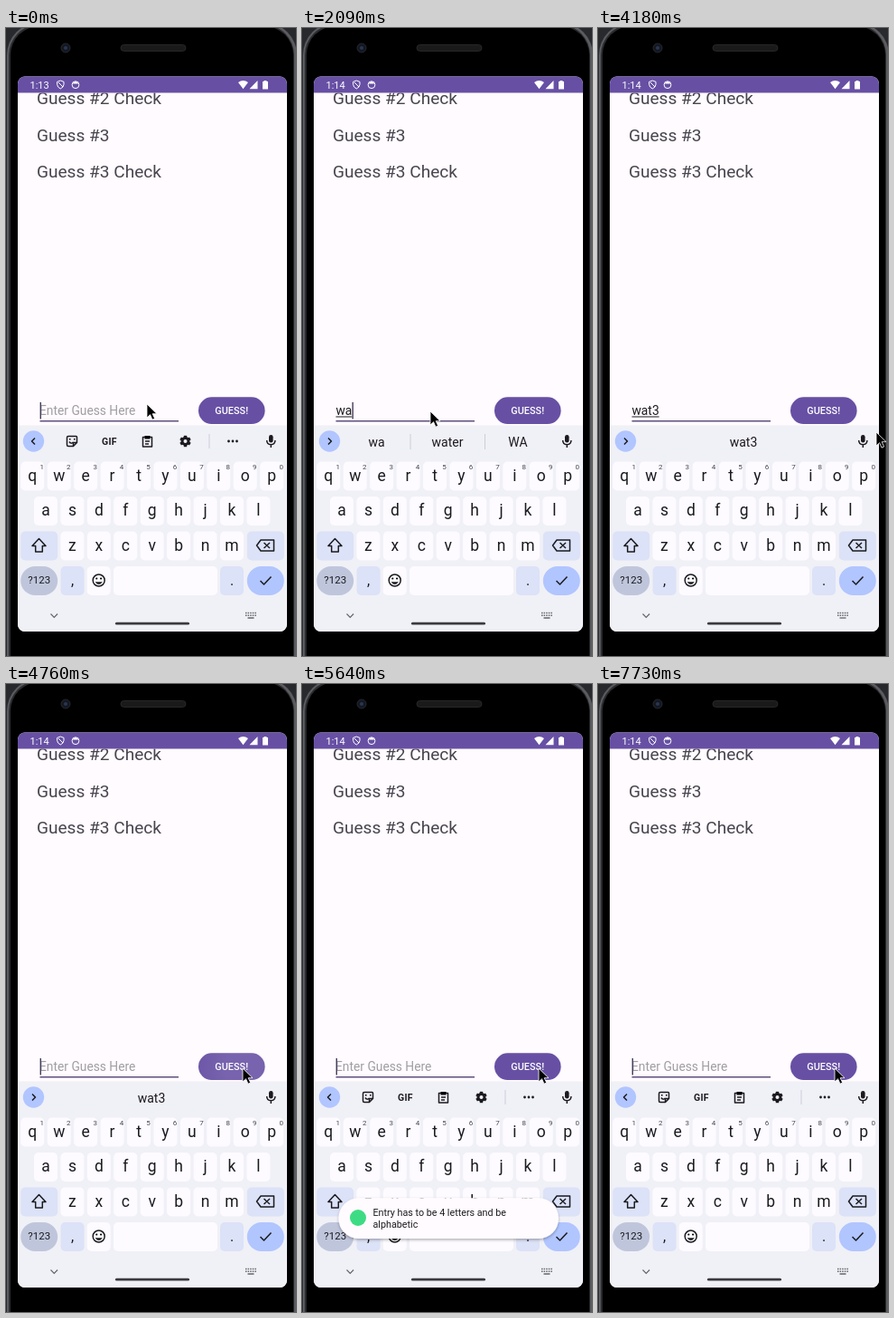
Animation of 321x693 px, one loop 8 s. Source, as an HTML page:

```html
<!DOCTYPE html>
<html lang="en">
<head>
<meta charset="utf-8">
<style>
html, body { margin: 0; width: 100%; height: 100%; overflow: hidden; background: #28292c; }
svg { display: block; width: 321px; height: 693px; font-family: Roboto, sans-serif; }
.mid { text-anchor: middle; }
.line { fill: none; stroke: #1b1b1f; stroke-width: 1.5; stroke-linejoin: round; }
.list { font-size: 19.1px; fill: #49454f; }
.entry { font-size: 13.8px; }
.word { font-size: 14px; fill: #1b1b1f; text-anchor: middle; }
</style>
</head>
<body>
<svg viewBox="0 0 321 693">
  <defs>
    <clipPath id="screen"><rect x="13" y="53.5" width="298" height="612.5" rx="8"/></clipPath>
    <clipPath id="page"><rect x="13" y="71.5" width="298" height="367"/></clipPath>
    <radialGradient id="glow" gradientUnits="userSpaceOnUse" cx="262" cy="424" r="50">
      <stop offset=".4" stop-color="#fff" stop-opacity=".11"/>
      <stop offset="1" stop-color="#fff" stop-opacity=".04"/>
    </radialGradient>
    <filter id="shadow" x="-10%" y="-30%" width="120%" height="170%">
      <feDropShadow dx="0" dy="1.5" stdDeviation="1.6" flood-opacity=".3"/>
    </filter>
  </defs>

  <!-- phone body -->
  <rect x="1" y="-6" width="321" height="740" rx="36" fill="#5a5c60"/>
  <rect x="3" y="-4" width="316" height="736" rx="34" fill="#2b2c2f"/>
  <rect x="5" y="-2" width="313" height="732" rx="32" fill="#000"/>
  <circle cx="66" cy="22" r="5" fill="#14171f" stroke="#24272d"/>
  <circle cx="66" cy="22" r="2" fill="#273659"/>
  <rect x="127" y="18.5" width="72" height="7" rx="3.5" fill="#1a1a1b" stroke="#272728"/>

  <g clip-path="url(#screen)">
    <rect x="13" y="53" width="298" height="613" fill="#fffbfe"/>
    <g clip-path="url(#page)" class="list">
      <text x="33.9" y="84">Guess #2 Check</text>
      <text x="33.9" y="124.5">Guess #3</text>
      <text x="33.9" y="165">Guess #3 Check</text>
    </g>

    <!-- status bar -->
    <rect x="13" y="53" width="298" height="18.5" fill="#6750a4"/>
    <g fill="#fff">
      <text id="clock" x="26.5" y="66.8" font-size="11"></text>
      <path d="M257 60Q262.5 56 268 60L262.5 67.2ZM278.500 58V67.200H269.500ZM284 59H285.500V58H288.500V59H290V67.500H284Z"/>
      <g fill="none" stroke="#fff">
        <path d="M60.3 58L64 59.4V62.3Q63.8 65.5 60.3 67Q56.8 65.5 56.6 62.3V59.4ZM58 60L63 65"/>
        <circle cx="77" cy="62.7" r="3.9"/>
      </g>
      <path d="M73.5 61.5Q77 56.5 80.5 61.5Z"/>
    </g>

    <!-- entry row -->
    <rect x="37.5" y="433" width="153.5" height="1.5" fill="#5e4f80"/>
    <text id="hint" class="entry" x="37" y="427" fill="#a09da3">Enter Guess Here</text>
    <text id="typed" class="entry" x="37.5" y="427" fill="#1c1b1f"></text>
    <rect id="under" x="37.5" y="428.5" height="1" fill="#1c1b1f"/>
    <rect id="caret" y="413" width="1.4" height="18.5" fill="#453b5c"/>
    <rect x="213" y="407.3" width="73.6" height="29.7" rx="14.85" fill="#6750a4"/>
    <rect id="ripple" x="213" y="407.3" width="73.6" height="29.7" rx="14.85" fill="url(#glow)"/>
    <text class="mid" x="249.7" y="426.3" font-size="10.9" font-weight="500" fill="#fff">GUESS!</text>

    <!-- keyboard -->
    <rect x="13" y="438.5" width="298" height="228" fill="#f0f0f7"/>
    <circle cx="30.5" cy="456" r="11.7" fill="#b1c5ff"/>
    <path id="chevron" class="line"/>
    <g id="tools">
      <path class="line" d="M69 450.500H77.500Q78.500 450.500 78.500 451.500V457.500L74.500 461.500H69Q67.500 461.500 67.500 460V452Q67.500 450.500 69 450.500ZM78.500 457.500H74.500V461.500M70 456.500Q72 459.500 74.500 457"/>
      <path d="M70 453h1.5v1.5h-1.5zM75 453h1.5v1.5h-1.5z"/>
      <text class="mid" x="114.5" y="460" font-size="10.5" font-weight="700" letter-spacing=".3" fill="#1b1b1f">GIF</text>
      <path class="line" d="M151.5 451.5H161.5V462H151.5ZM154 456H159M154 459H158"/>
      <path d="M153.5 450H159.5V453.5H153.5Z"/>
      <g id="gear" fill="#1b1b1f"><circle cx="198.5" cy="456" r="3.5" fill="none" stroke="#1b1b1f" stroke-width="3"/></g>
      <path d="M225 448V464" stroke="#cccdd6"/>
      <g fill="#1b1b1f"><circle cx="246.5" cy="456" r="1.4"/><circle cx="251" cy="456" r="1.4"/><circle cx="255.5" cy="456" r="1.4"/></g>
    </g>
    <g id="words">
      <path id="rules" d="M120 448V465M202.5 448V465" stroke="#cccdd6"/>
      <text class="word" x="82.5" y="461.5"></text>
      <text class="word" x="161" y="461.5"></text>
      <text class="word" x="239" y="461.5"></text>
    </g>
    <rect x="291" y="449" width="4.6" height="8.5" rx="2.3" fill="#1b1b1f"/>
    <path class="line" d="M288.7 455Q288.7 459.7 293.3 459.7Q297.9 459.7 297.9 455M293.3 459.7V463"/>
    <g id="keys"></g>
    <g class="line">
      <path d="M36.5 563.5L44 571.5H40.3V578H32.7V571.5H29Z"/>
      <path d="M277.5 571L282 565H296.5V577H282ZM285.5 568L292 574M292 568L285.5 574"/>
      <path d="M281.5 610L285.5 614L293.5 605.5"/>
      <circle cx="102.7" cy="609.5" r="6.5"/>
      <path d="M99 611.5Q102.7 616 106.4 611.5Z" fill="#1b1b1f" stroke-width=".5"/>
    </g>
    <circle cx="100.3" cy="607.5" r="1.1"/><circle cx="105.1" cy="607.5" r="1.1"/>
    <path d="M49.5 646.5L53.3 650.3L57.1 646.5" fill="none" stroke="#65656b" stroke-width="1.2"/>
    <rect x="121" y="655.8" width="82" height="2.8" rx="1.4" fill="#3a3a3e"/>
    <path d="M265 645.5H277M265 648.2H277" stroke="#65656b" stroke-width="1.5" stroke-dasharray="1.5 1.1"/>
    <path d="M267.5 651H274.5" stroke="#65656b" stroke-width="1.3"/>

    <!-- toast -->
    <g id="toast">
      <rect id="card" x="40.5" y="567.3" width="243.5" height="44.7" rx="22" fill="#fffbfe" filter="url(#shadow)"/>
      <g id="message" font-size="10.75" fill="#1c1b1f">
        <circle cx="62" cy="589" r="9" fill="#3ddc84"/>
        <text x="78.5" y="587">Entry has to be 4 letters and be</text>
        <text x="78.5" y="599.6">alphabetic</text>
      </g>
    </g>
  </g>
  <path id="pointer" d="M0 0V15L3.6 11.7L6 17.2L8.6 16L6.2 10.7H11Z" fill="#000" stroke="#fff" stroke-width=".8"/>
</svg>
<script>
const $ = id => document.getElementById(id);
const attr = (el, values) => { for (const k in values) el.setAttribute(k, values[k]); };
const show = (id, on) => attr($(id), { opacity: +on });

const PLAIN = '#fdfbff', SOFT = '#dce2f7';
const keys = [];
function key(x, y, w, label = '', fill = PLAIN, size = 17.5, rx = 5) {
  keys.push(`<rect x="${x - w / 2}" y="${y}" width="${w}" height="32" rx="${rx}" fill="${fill}"/>
    <text class="mid" x="${x}" y="${y + 15.5 + size * .33}" font-size="${size}" fill="#1b1b1f">${label}</text>`);
}
[['qwertyuiop', 29.3, 478.5], ['asdfghjkl', 44, 517], ['zxcvbnm', 73.4, 555.5]].forEach(([row, x0, y], r) =>
  [...row].forEach((c, i) => {
    const x = x0 + i * 29.43;
    key(x, y, 26, c);
    if (!r) keys.push(`<text class="mid" x="${x + 10.5}" y="487" font-size="8" fill="#45464f">${(i + 1) % 10}</text>`);
  }));
key(36.7, 555.5, 41, '', SOFT);
key(287.3, 555.5, 41, '', SOFT);
key(36.7, 594, 41, '?123', '#bfc6dc', 11.5, 16);
key(73.6, 594, 26, ',', SOFT, 16);
key(102.7, 594, 26);
key(176.5, 594, 115);
key(250, 594, 26, '.', SOFT, 16);
key(287.3, 594, 41, '', '#b1c5ff', 12, 16);
$('keys').innerHTML = keys.join('');

for (let a = 0; a < 360; a += 60)
  $('gear').innerHTML += `<rect x="196.8" y="449.8" width="3.4" height="3" transform="rotate(${a} 198.5 456)"/>`;

// Each step lists only what changes at that time.
// toast: scale, card opacity, message opacity
const HIDDEN = [1, 0, 0];
const steps = [
  [0, { clock: '1:13', text: '', under: 0, caret: 1, words: null, ripple: 0, toast: HIDDEN, at: [156, 415] }],
  [140, { clock: '1:14', at: [142, 423] }],
  [440, { caret: 0 }],
  [1040, { text: 'w', caret: 1 }],
  [1190, { under: 1, words: ['', '', ''] }],
  [1340, { words: ['w', 'we', 'what'] }],
  [1640, { text: 'wa' }],
  [2090, { under: 2, words: ['wa', 'water', 'WA'] }],
  [2680, { caret: 0 }],
  [2980, { text: 'wat', caret: 1 }],
  [3130, { under: 3 }],
  [3280, { words: ['wat', 'water', 'what'] }],
  [3580, { text: 'wat3' }],
  [3880, { under: 4, words: ['', 'wat3', ''] }],
  [4030, { at: [225, 438] }],
  [4180, { at: [308, 446], caret: 0 }],
  [4330, { at: [276, 430] }],
  [4470, { at: [262, 424] }],
  [4760, { text: '', under: 0, caret: 1, ripple: 1 }],
  [5050, { words: null, ripple: .4, toast: [.97, 1, .3] }],
  [5200, { caret: 0, ripple: 0, toast: [1, 1, 1] }],
  [5640, { caret: 1 }],
  [6240, { caret: 0 }],
  [6690, { caret: 1 }],
  [7130, { caret: 0, toast: [.967, 1, .4] }],
  [7280, { toast: [.94, .3, 0] }],
  [7430, { toast: HIDDEN }],
  [7730, { caret: 1 }],
];

const typed = $('typed');
const words = document.querySelectorAll('.word');

function draw(t) {
  const s = Object.assign({}, ...steps.filter(([time]) => time <= t).map(step => step[1]));
  $('clock').textContent = s.clock;
  typed.textContent = s.text;
  show('hint', !s.text);
  const width = n => n ? typed.getSubStringLength(0, n) : 0;
  attr($('under'), { width: width(s.under) });
  attr($('caret'), { x: 37.6 + width(s.text.length), opacity: s.caret });

  attr($('chevron'), { d: s.words ? 'M29 452.5L32.5 456L29 459.5' : 'M32 452.5L28.5 456L32 459.5' });
  show('tools', !s.words);
  words.forEach((el, i) => el.textContent = s.words ? s.words[i] : '');
  show('rules', !!s.words?.[0]);

  show('ripple', s.ripple);
  const [scale, card, message] = s.toast;
  attr($('toast'), { transform: `translate(162 590.5) scale(${scale}) translate(-162 -590.5)` });
  show('card', card);
  show('message', message);
  attr($('pointer'), { transform: `translate(${s.at})` });
}

const start = performance.now();
function frame() {
  draw((performance.now() - start) % 8000);
  requestAnimationFrame(frame);
}
frame();
</script>
</body>
</html>
```
